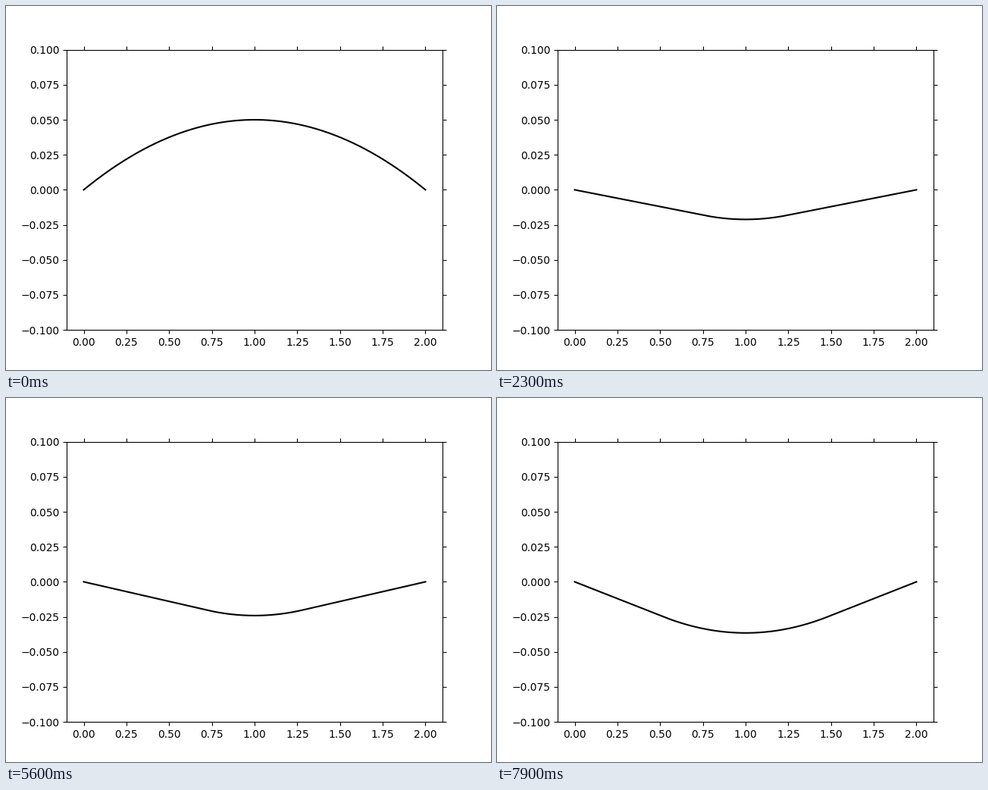
A matplotlib script that plays this animation: 640 px wide and 480 px high, repeating every 8 s.

```python
import numpy as np
import matplotlib.pyplot as plt
from matplotlib.animation import FuncAnimation

LENGTH = 2.0    # string length
PEAK = 0.05     # initial height at the middle
STEP = 0.12     # distance a wave travels per frame
FRAMES = 80

x = np.linspace(0, LENGTH, 401)


def shape(s):
    """Initial parabola, extended as an odd function of period 2 * LENGTH."""
    s = (s + LENGTH) % (2 * LENGTH) - LENGTH
    return PEAK * s * (LENGTH - np.abs(s))


def displacement(shift):
    """d'Alembert solution for a string released from rest."""
    return (shape(x - shift) + shape(x + shift)) / 2


fig, ax = plt.subplots(figsize=(6.4, 4.8), dpi=100)
ax.set_xlim(-0.1, 2.1)
ax.set_ylim(-0.1, 0.1)
ax.tick_params(top=True, right=True)
line, = ax.plot(x, displacement(0), color="black", lw=1.5)


def update(i):
    line.set_ydata(displacement(STEP * i))
    return line,


anim = FuncAnimation(fig, update, frames=FRAMES, interval=100,
                     repeat=True, repeat_delay=0)
plt.show()
```
